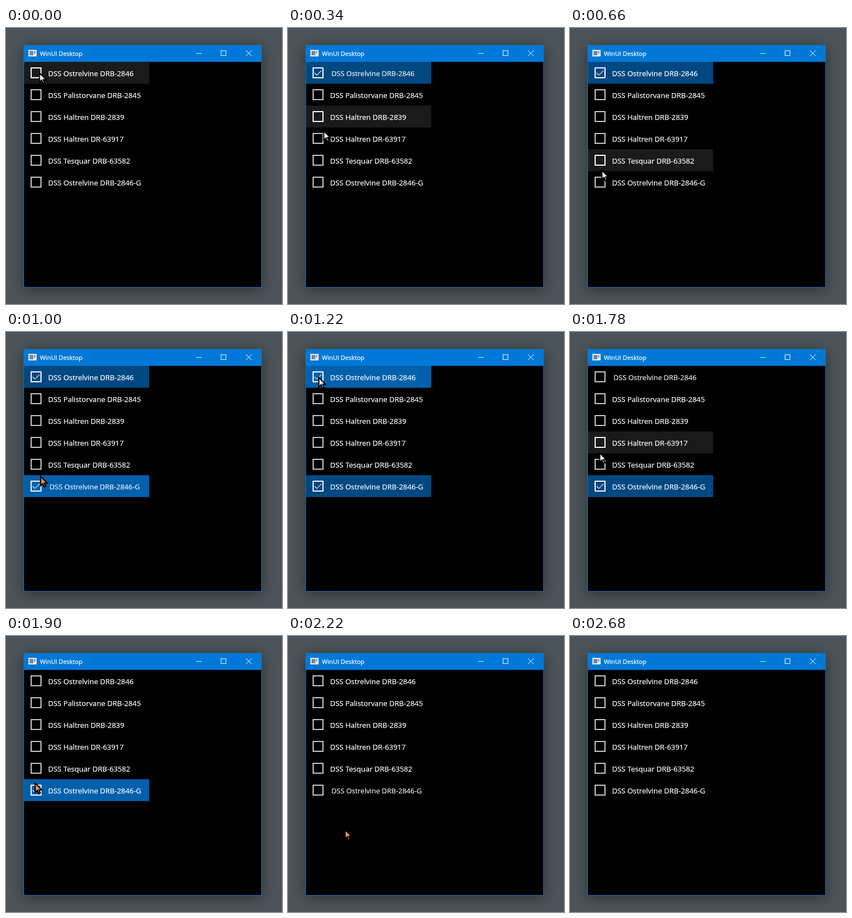
These frames come from a looping animation (505x505 px, 3.68 s). An HTML page with a canvas:

```html
<!DOCTYPE html>
<html lang="en">
<head>
<meta charset="utf-8">
<title>WinUI Desktop</title>
<style>
  html, body { margin: 0; width: 100%; height: 100%; overflow: hidden; background: #4c5459; }
  canvas { display: block; width: 505px; height: 505px; }
</style>
</head>
<body>
<canvas id="stage" width="505" height="505"></canvas>
<script>
const ctx = document.getElementById('stage').getContext('2d');
const LOOP = 3680;
const TICK = 2680 / 24;
const ACCENT = '#0078d7';
const FONT = '"Open Sans", "Noto Sans", sans-serif';
const LIST = { x: 33, y: 62, w: 229, rowH: 40 };

const ships = [
  'DSS Ostrelvine DRB-2846',
  'DSS Palistorvane DRB-2845',
  'DSS Haltren DRB-2839',
  'DSS Haltren DR-63917',
  'DSS Tesquar DRB-63582',
  'DSS Ostrelvine DRB-2846-G'
];

// A click lights the pointer, presses its row, then toggles it on release.
const HOLD = 120, GLOW = 240, SETTLE = 340;
const clicks = [
  { row: 0, lit: 100, down: 100 },
  { row: 5, lit: 880, down: 880 },
  { row: 0, lit: 1540, down: 1540 },
  { row: 5, lit: 1900, down: 2000 }
];

// Pointer stops, timed in ticks
const stops = [
  { at: 2, x: 61, y: 82 },
  { at: 3, x: 65, y: 188 },
  { at: 6, x: 58, y: 260 },
  { at: 7, x: 63, y: 264 },
  { at: 9, x: 63, y: 264 },
  { at: 11, x: 56, y: 83 },
  { at: 12, x: 55, y: 78 },
  { at: 15, x: 55, y: 78 },
  { at: 17, x: 53, y: 269 },
  { at: 19, x: 53, y: 269 },
  { at: 24, x: 195, y: 506 }
];

const within = (t, from, length) => t >= from && t < from + length;
const easeOut = p => 1 - (1 - p) ** 2;

function pointerAt(tick) {
  const next = stops.findIndex(s => s.at > tick);
  if (next === 0) return stops[0];
  if (next < 0) return stops[stops.length - 1];
  const a = stops[next - 1], b = stops[next];
  const k = easeOut((tick - a.at) / (b.at - a.at));
  return { x: Math.round(a.x + (b.x - a.x) * k), y: Math.round(a.y + (b.y - a.y) * k) };
}

function rect(x, y, w, h, color) {
  ctx.fillStyle = color;
  ctx.fillRect(x, y, w, h);
}

function box(x, y, size, color, width) {
  ctx.strokeStyle = color;
  ctx.lineWidth = width;
  ctx.strokeRect(x, y, size, size);
}

function line(points, color, width = 1, close = false) {
  ctx.beginPath();
  points.forEach(([x, y]) => ctx.lineTo(x, y));
  if (close) ctx.closePath();
  ctx.strokeStyle = color;
  ctx.lineWidth = width;
  ctx.stroke();
}

function text(str, x, y, size) {
  ctx.font = `${size}px ${FONT}`;
  ctx.fillStyle = ctx.strokeStyle = '#fff';
  ctx.lineWidth = 0.25;
  ctx.fillText(str, x, y);
  ctx.strokeText(str, x, y);
}

function drawWindow() {
  rect(0, 0, 505, 505, '#4c5459');
  ctx.save();
  ctx.shadowColor = 'rgba(0, 0, 0, .42)';
  ctx.shadowBlur = 24;
  ctx.shadowOffsetY = 4;
  rect(32, 31, 436, 444, '#1872ba');
  ctx.restore();
  rect(33, 32, 434, 30, ACCENT);
  rect(33, 62, 434, 412, '#000');

  rect(41, 40, 15, 12, '#eef1f3');
  rect(43, 42, 7, 8, '#7c868e');
  rect(51, 42, 3, 5, '#98a3ab');
  text('WinUI Desktop', 62, 51, 11.27);

  rect(348, 46, 10, 1, '#fff');
  box(393.5, 41.5, 9, '#fff', 1);
  line([[439, 41], [449.5, 51.5]], '#fff');
  line([[449.5, 41], [439, 51.5]], '#fff');
}

function rowColor(selected, hovered, pressed) {
  if (selected) return pressed ? '#006cc1' : hovered ? '#0060ac' : '#004881';
  return pressed ? '#333' : hovered ? '#1a1a1a' : '#000';
}

function drawRow(row, t, hover) {
  const y = LIST.y + row * LIST.rowH;
  const own = clicks.filter(c => c.row === row);
  const selected = own.filter(c => t >= c.down + HOLD).length % 2 === 1;
  const pressed = own.some(c => within(t, c.down, HOLD));
  const shrunk = own.some(c => within(t, c.down, SETTLE));
  const hovered = within(hover.y, y, LIST.rowH);

  rect(LIST.x, y, LIST.w, LIST.rowH, rowColor(selected, hovered, pressed));
  box(46, y + 11, 18, selected || hovered ? '#fff' : '#ccc', 2);
  if (selected) line([[48.5, y + 20], [52.8, y + 24.3], [61.5, y + 15.6]], '#fff', 1.1);

  ctx.save();
  if (shrunk) {
    ctx.globalAlpha = 0.9;
    ctx.translate(163, y + 21);
    ctx.scale(0.97, 0.97);
    ctx.translate(-163, -y - 21);
  }
  text(ships[row], 77, y + 26, 13.4);
  ctx.restore();
}

function drawPointer({ x, y }, color) {
  ctx.save();
  ctx.translate(x + 0.5, y + 0.5);
  line([[0, 0], [0, 16.5], [3.8, 13], [6.5, 19], [9.2, 17.8], [6.6, 12], [11.8, 12]], '#000', 2, true);
  ctx.fillStyle = color;
  ctx.fill();
  ctx.stroke();
  ctx.restore();
}

function draw(t) {
  // The pointer moves in coarse ticks, and the hovered row lags behind it.
  const tick = Math.floor((t + 17) / TICK);
  const hover = pointerAt(tick - 0.3);
  const lit = clicks.some(c => t >= c.lit && t < c.down + GLOW);
  drawWindow();
  ships.forEach((_, row) => drawRow(row, t, hover));
  drawPointer(pointerAt(tick), lit ? '#ff914d' : '#fff');
}

const start = performance.now();
function frame() {
  draw((performance.now() - start) % LOOP);
  requestAnimationFrame(frame);
}
frame();
</script>
</body>
</html>
```
